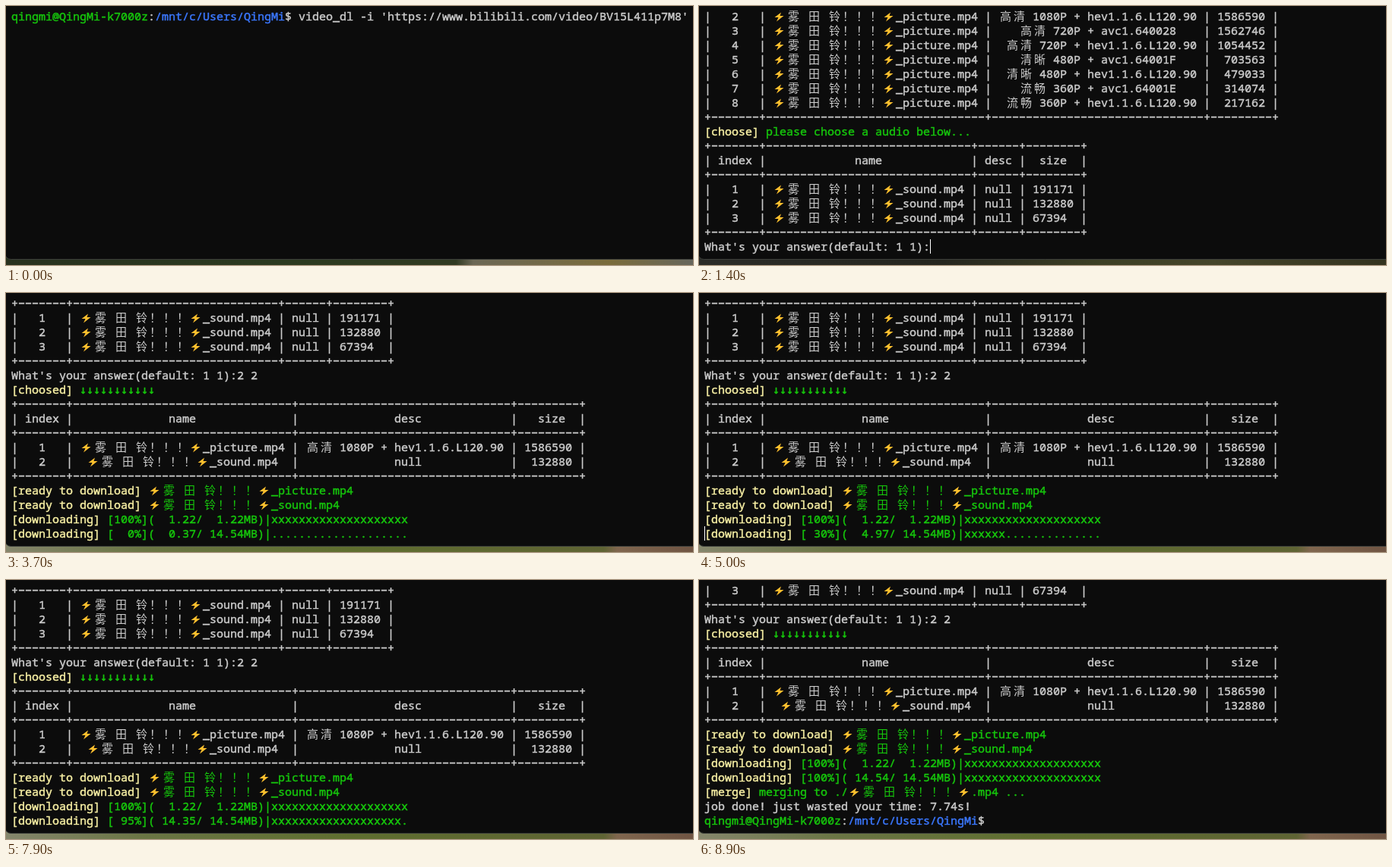
Write an HTML page with a canvas that moves like this. It is 904 px wide and 342 px high and loops after 9100 ms.

```html
<!DOCTYPE html>
<html lang="zh-CN">
<head>
<meta charset="utf-8">
<title>video_dl</title>
<style>
  html, body { margin: 0; width: 100%; height: 100%; overflow: hidden; background: #0c0c0c; }
  canvas { display: block; }
</style>
</head>
<body>
<canvas id="stage" width="904" height="342"></canvas>
<script>
const ctx = document.getElementById('stage').getContext('2d');
const LOOP = 9100, LEFT = 7, TOP = 4, CELL = 9, LINE = 19, ROWS = 17;
const GREY = '#cccccc', GREEN = '#16c60c', BLUE = '#3b78ff', YELLOW = '#f9f1a5';
const MONO = '500 15px "Noto Sans Mono", "DejaVu Sans Mono", monospace';
const ARROW = '15px "DejaVu Sans Mono", monospace';
const CJK = '15px "Noto Sans CJK SC", "Noto Sans CJK", sans-serif';

const isWide = ch => /[\u3000-\u9fff\uff00-\uffef⚡]/.test(ch);
const cells = s => [...s].reduce((n, ch) => n + (isWide(ch) ? 2 : 1), 0);

// A line is a list of [text, colour] runs.
const plain = s => [[s, GREY]];
const label = (tag, s) => [[`[${tag}]`, YELLOW], [' ' + s, GREEN]];

function center(s, width) {
  const spare = width - cells(s);
  const left = spare % 2 && cells(s) % 2 === 0 ? (spare + 1) / 2 : Math.floor(spare / 2);
  return ' '.repeat(left) + s + ' '.repeat(spare - left);
}

function table(records) {
  const all = [['index', 'name', 'desc', 'size'], ...records.map((r, i) => [String(i + 1), ...r])];
  const widths = all[0].map((_, c) => Math.max(...all.map(r => cells(r[c]))));
  const rule = plain('+' + widths.map(w => '−'.repeat(w + 2) + '+').join(''));
  const [head, ...body] = all.map(r => plain('|' + r.map((s, c) => ` ${center(s, widths[c])} |`).join('')));
  return [rule, head, rule, ...body, rule];
}

const TITLE = '⚡雾 田 铃！！！⚡';
const PICTURE = TITLE + '_picture.mp4', SOUND = TITLE + '_sound.mp4';
const PROMPT = [['qingmi@QingMi-k7000z', GREEN], [':', GREY], ['/mnt/c/Users/QingMi', BLUE], ['$ ', GREY]];
const COMMAND = [...PROMPT, ["video_dl -i 'https://www.bilibili.com/video/BV15L411p7M8'", GREY]];
const QUESTION = "What's your answer(default: 1 1):";

const videos = [
  ['高清 1080P + avc1.640032', 2411370], ['高清 1080P + hev1.1.6.L120.90', 1586590],
  ['高清 720P + avc1.640028', 1562746], ['高清 720P + hev1.1.6.L120.90', 1054452],
  ['清晰 480P + avc1.64001F', 703563], ['清晰 480P + hev1.1.6.L120.90', 479033],
  ['流畅 360P + avc1.64001E', 314074], ['流畅 360P + hev1.1.6.L120.90', 217162]
].map(([desc, size]) => [PICTURE, desc, String(size)]);
const audios = [191171, 132880, 67394].map(size => [SOUND, 'null', String(size)]);

const MENU = [
  label('choose', 'please choose a video below...'), ...table(videos),
  label('choose', 'please choose a audio below...'), ...table(audios)
];
const CHOSEN = [label('choosed', '↓'.repeat(11)), ...table([videos[1], audios[1]])];
const READY = [PICTURE, SOUND].map(name => label('ready to download', name));

function progress(done, total) {
  const steps = Math.floor(done / total * 20 + 1e-9);
  const size = n => n.toFixed(2).padStart(6);
  return label('downloading', `[${String(steps * 5).padStart(3)}%](${size(done)}/${size(total)}MB)|` +
    'x'.repeat(steps) + '.'.repeat(20 - steps));
}

const ramp = (t, t0, t1, a, b) => a + (b - a) * Math.min(1, Math.max(0, (t - t0) / (t1 - t0)));

function videoDone(t) {
  if (t >= 8000) return 14.54;
  return t < 6300 ? ramp(t, 3595, 6300, 0, 9.56) : ramp(t, 6300, 7900, 9.56, 14.35);
}

// Terminal contents; the cursor sits on the last line.
function terminal(t) {
  const lines = [COMMAND];
  const at = (col, ...more) => ({ lines: [...lines, ...more], col });
  if (t < 1000) return at(99);
  if (t >= 1100) lines.push(label('matching', 'parsing the link, this takes a moment.'));
  if (t >= 1200) lines.push(label('matched', 'reading the stream list...'));
  if (t < 1400) return at(0, []);

  lines.push(...MENU);
  const typed = '2 2'.slice(0, Math.max(0, Math.floor((t - 1900) / 200)));
  const answer = plain(QUESTION + typed);
  if (t < 2700) return at(cells(QUESTION + typed), answer);

  lines.push(answer, ...CHOSEN);
  if (t >= 2900) lines.push(...READY);
  if (t < 3200) return at(0, []);

  lines.push(progress(ramp(t, 3200, 3600, 0, 1.22), 1.22));
  if (t < 3600) return at(0);
  lines.push(progress(videoDone(t), 14.54));
  if (t < 8100) return at(0);

  lines.push(label('merge', `merging to ./${TITLE}.mp4 ...`));
  if (t < 8200) return at(0, []);
  return at(42, plain('job done! just wasted your time: 7.74s!'), PROMPT);
}

function cursorOn(t) {
  if (t < 2100) return (t >= 300 && t < 800) || (t >= 1000 && t < 1500);
  return t < 2800 || (t + 4700) % 1060 < 530;
}

function bolt(x, y) {
  const points = [[11, 4.5], [2.5, 11], [7.5, 11], [5, 16.5], [14.5, 9], [9.5, 9]];
  ctx.beginPath();
  points.forEach(([px, py]) => ctx.lineTo(x + px, y + py));
  ctx.fillStyle = '#ffc02e';
  ctx.fill();
}

// A hairline outline gives the narrow glyphs a semi-bold weight.
function glyph(ch, x, y, colour) {
  const wide = isWide(ch);
  ctx.font = wide ? CJK : ch === '↓' ? ARROW : MONO;
  ctx.fillStyle = ctx.strokeStyle = colour;
  ctx.fillText(ch, x + (wide ? 2 : 0), y + 15);
  if (wide) return;
  ctx.lineWidth = 0.45;
  ctx.strokeText(ch, x, y + 15);
}

function drawLine(runs, row) {
  const y = TOP + row * LINE;
  let x = LEFT;
  for (const [text, colour] of runs) {
    for (const ch of text) {
      if (ch === '⚡') bolt(x, y);
      else glyph(ch, x, y, colour);
      x += CELL * cells(ch);
    }
  }
}

// Wallpaper strips seen below the window: [position, colour] stops.
const FUR = [[0, '#28321f'], [0.4, '#2b3a20'], [0.655, '#303a22'], [0.68, '#6c6856'], [0.88, '#7a6c3c'], [1, '#66665c']];
const DUSK = [[0, '#2b2c28'], [0.35, '#25261f'], [0.58, '#3c3f24'], [0.75, '#45452a'], [1, '#33331f']];
const MEADOW = [[0, '#85866c'], [0.2, '#6a7544'], [0.5, '#5f6e2f'], [0.87, '#5f6434'], [0.89, '#80664e'], [1, '#705543']];

function strip(stops, alpha) {
  const fill = ctx.createLinearGradient(0, 0, 904, 0);
  stops.forEach(stop => fill.addColorStop(...stop));
  ctx.globalAlpha = alpha;
  ctx.fillStyle = fill;
  ctx.fillRect(0, 320, 904, 22);
  ctx.globalAlpha = 1;
}

function draw(t) {
  strip(t < 200 ? FUR : DUSK, 1);
  strip(MEADOW, ramp(t, 2000, 3000, 0, 1));

  ctx.beginPath();
  ctx.roundRect(-1.5, -20, 930, 354.5, 8);
  ctx.fillStyle = '#0c0c0c';
  ctx.fill();
  ctx.lineWidth = 1;
  ctx.strokeStyle = '#3d3f3b';
  ctx.stroke();

  const { lines, col } = terminal(t);
  const shown = lines.slice(-ROWS);
  shown.forEach(drawLine);
  if (cursorOn(t)) {
    ctx.fillStyle = '#ffffff';
    ctx.fillRect(LEFT + col * CELL, TOP + (shown.length - 1) * LINE, 1, LINE);
  }
}

const start = performance.now();
function tick() {
  const t = (performance.now() - start) % LOOP;
  draw(Math.floor(t / 100) * 100);
  requestAnimationFrame(tick);
}
tick();
</script>
</body>
</html>
```
